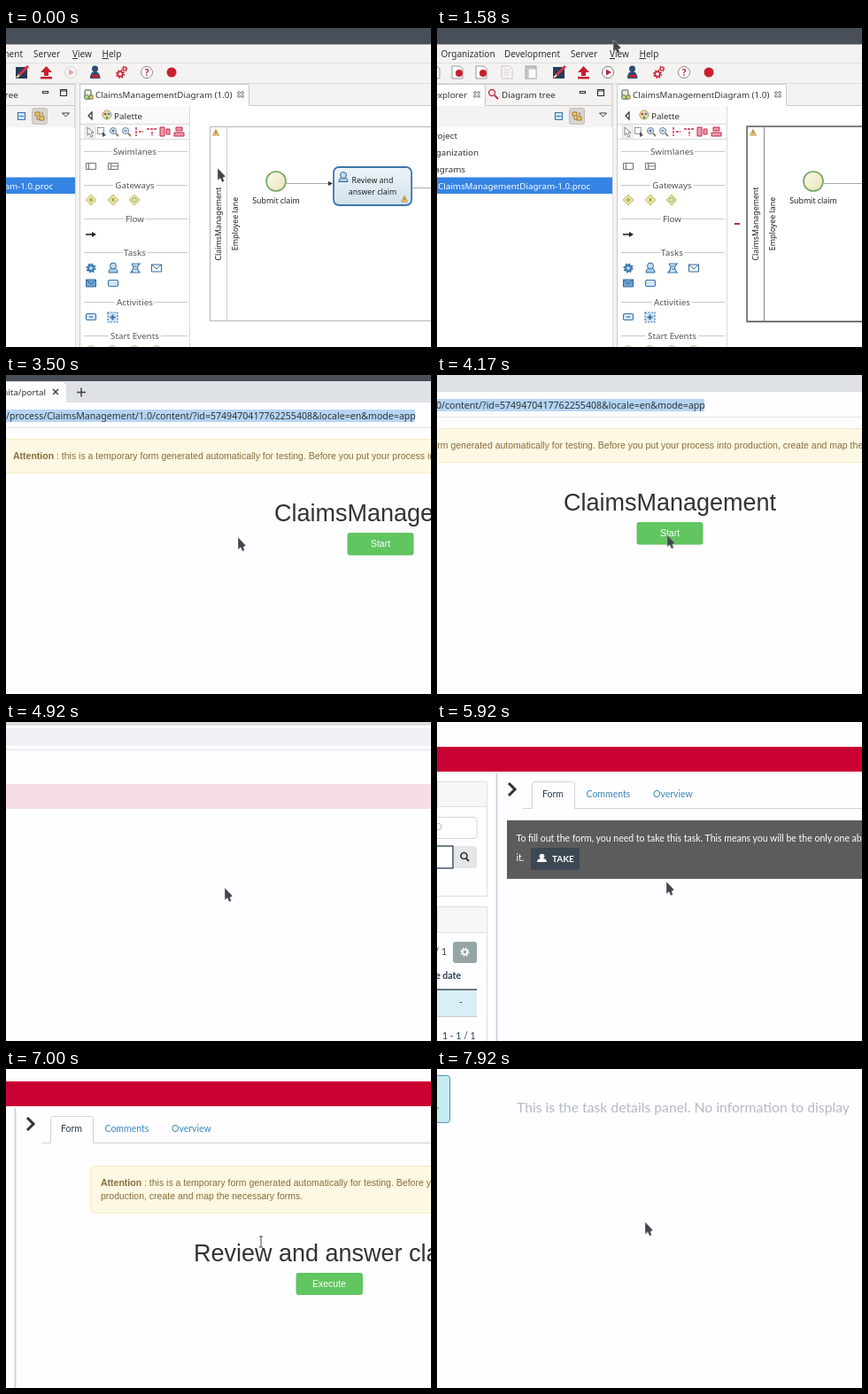
An HTML page that plays this animation: 480x360 px, repeating every 8 s.

```html
<!DOCTYPE html>
<html lang="en">
<head>
<meta charset="utf-8">
<title>Process designer walkthrough</title>
<style>
html, body { margin: 0; width: 100%; height: 100%; overflow: hidden; background: #fefdff; }
svg { display: block; width: 480px; height: 360px; }
text { white-space: pre; }
.ui { font: 9.8px "Noto Sans", sans-serif; fill: #2e3436; }
.menu { font-size: 10px; }
.heading { fill: #505457; }
.small { font-size: 8.8px; fill: #1d2022; }
.mid { text-anchor: middle; }
.end { text-anchor: end; }
.web { font: 10.5px "Liberation Sans", Arial, sans-serif; fill: #8a6d3b; }
.web .title { font-size: 27px; fill: #333; text-anchor: middle; }
.web .label { fill: #fff; text-anchor: middle; }
.portal { font: 10.5px Lato, sans-serif; fill: #2c3e50; }
.bold { font-weight: bold; }
.link { fill: #3a87ba; }
.line { fill: none; stroke: #c9c9c9; }
.blue { fill: #d3e5f4; stroke: #3a76ab; stroke-width: 1.2; }
.red { fill: none; stroke: #c22a4a; stroke-width: 1.4; }
.dark { fill: none; stroke: #333; stroke-width: 1.2; }
.gray { fill: #fff; stroke: #777; }

/* Camera moves and hard cuts share one 8 s clock. */
.move, .cut { animation: 8s ease-in-out infinite; }
.cut { opacity: 0; animation-timing-function: step-end; }
#editor { animation-name: editor-on; }
#editor .move { animation-name: editor-pan; }
#browser { animation-name: browser-on; }
#browser .move { animation-name: browser-pan; }
#testForm { animation-name: test-form-on; }
#portal { animation-name: portal-on; }
#portal > .move { animation-name: portal-pan; }
#header { animation-name: header-fade; animation-timing-function: linear; }
#lists { animation-name: lists-on; }
#takeBox { animation-name: take-on; }
#taskForm { animation-name: task-form-on; }
#details { animation-name: details-on; }
.idle { animation-name: idle-on; }
.picked { animation-name: picked-on; }
#pointer { animation-name: pointer-path; }
#arrow { animation-name: arrow-on; }
#beam { animation-name: beam-on; }

@keyframes editor-on { 0% { opacity: 1 } 29.2% { opacity: 0 } }
@keyframes idle-on { 0% { opacity: 1 } 5% { opacity: 0 } }
@keyframes picked-on { 0% { opacity: 0 } 5%, 100% { opacity: 1 } }
@keyframes browser-on { 0% { opacity: 0 } 29.2% { opacity: 1 } 53.8% { opacity: 0 } }
@keyframes test-form-on { 0% { opacity: 0 } 33.5%, 100% { opacity: 1 } }
@keyframes portal-on { 0% { opacity: 0 } 53.8%, 100% { opacity: 1 } }
@keyframes header-fade { 0%, 61% { opacity: 0 } 61.5% { opacity: .12 } 64%, 100% { opacity: 1 } }
@keyframes lists-on { 0% { opacity: 0 } 65% { opacity: 1 } 93.2%, 100% { opacity: 0 } }
@keyframes take-on { 0% { opacity: 0 } 69% { opacity: 1 } 80.2%, 100% { opacity: 0 } }
@keyframes task-form-on { 0% { opacity: 0 } 82.8% { opacity: 1 } 93.2%, 100% { opacity: 0 } }
@keyframes details-on { 0% { opacity: 0 } 95.8%, 100% { opacity: 1 } }
@keyframes arrow-on { 0% { opacity: 1 } 86.5% { opacity: 0 } 89.2%, 100% { opacity: 1 } }
@keyframes beam-on { 0% { opacity: 0 } 86.5% { opacity: 1 } 89.2%, 100% { opacity: 0 } }

@keyframes editor-pan {
  0%, 11.5% { transform: translate(-120px, 0) }
  19.75% { transform: translate(0, 0) }
  24%, 100% { transform: translate(40px, 0) }
}
@keyframes browser-pan {
  0%, 31% { transform: translate(50px, 12px) }
  41%, 43.75% { transform: translate(0, 0) }
  51.5%, 100% { transform: translate(-160px, -12px) }
}
@keyframes portal-pan {
  0%, 53.8% { transform: translate(0, 56px) }
  58%, 63.5% { transform: translate(0, 42px) }
  72%, 74% { transform: translate(0, 0) }
  78.5%, 81% { transform: translate(107px, 26px) }
  87.5% { transform: translate(-57px, -14px) }
  92%, 100% { transform: translate(-134px, -61px) }
}
@keyframes pointer-path {
  0%, 6% { transform: translate(239px, 158px) }
  11% { transform: translate(236px, 100px) }
  19.75% { transform: translate(199px, 13px) }
  24%, 31% { transform: translate(234px, 46px) }
  40%, 43.75% { transform: translate(262px, 183px) }
  51.5% { transform: translate(260px, 180px) }
  58%, 63.5% { transform: translate(247px, 187px) }
  72%, 74% { transform: translate(259px, 180px) }
  78.5%, 81% { transform: translate(240px, 180px) }
  87.5% { transform: translate(288px, 195px) }
  92% { transform: translate(278px, 190px) }
  97%, 100% { transform: translate(235px, 172.5px) }
}
</style>
</head>
<body>
<svg viewBox="0 0 480 360">
  <defs>
    <g id="person"><path d="M-5 5.500q0-5 5-5t5 5z" fill="#a9cbe8" stroke="#2f689c"/><circle cy="-2" r="3.500" fill="#c3dcf1" stroke="#2f689c"/></g>
    <g id="gear" fill="none"><circle r="4.600" stroke-width="2" stroke-dasharray="1.800 1.800"/><circle r="3" stroke-width="1.800"/></g>
    <g id="mail"><path d="M-5.500-4h11v8h-11z" stroke="#2f689c"/><path d="M-5.500-4 0 1 5.500-4" fill="none" stroke="#2f689c"/></g>
    <g id="warn"><path d="M0-3.500 3.500 3H-3.500z" fill="#f3d98c" stroke="#c09a45" stroke-linejoin="round"/><path d="M0-1.500V1.500" stroke="#6b5320"/></g>
    <path id="diamond" d="M0-6 6 0 0 6-6 0z" fill="#e7e6a4" stroke="#c2bd6a"/>
    <path id="close" d="M-3.500-2-2-3.500 0-1.500 2-3.500 3.500-2 1.500 0 3.500 2 2 3.500 0 1.500-2 3.500-3.500 2-1.500 0z" fill="#fff" stroke="#4a4a4a"/>
    <path id="sheet" d="M-6-7H3L6-4V7H-6z" fill="#fafafa" stroke="#9a9a9a"/>
    <g id="zoom" fill="none"><circle cx="-1" cy="-1" r="3.500" fill="#e3eef8" stroke="#5a7fa8"/><path d="M2 2 5 5" stroke="#8a7a60" stroke-width="1.800"/></g>
    <linearGradient id="taskFill" x2="0" y2="1"><stop stop-color="#eef3f8"/><stop offset="1" stop-color="#d3e1ee"/></linearGradient>
    <linearGradient id="eventFill" x2="1" y2="1"><stop stop-color="#fdfbee"/><stop offset="1" stop-color="#ebe3b8"/></linearGradient>
  </defs>

  <g id="editor" class="cut"><g class="move ui">
    <rect x="-130" width="900" height="360" fill="#f4f3f2"/>
    <rect x="-130" width="900" height="18.500" fill="#494f59"/>
    <g class="menu">
      <text x="-28" y="33">Edit</text><text x="4.500" y="33">Organization</text><text x="76" y="33">Development</text>
      <text x="151" y="33">Server</text><text x="195" y="33"><tspan text-decoration="underline">V</tspan>iew</text>
      <text x="228.500" y="33"><tspan text-decoration="underline">H</tspan>elp</text>
    </g>
    <path class="line" d="M-130 39.500H770M-130 62.500H770" stroke-opacity=".5"/>

    <g transform="translate(0 50)">
      <use href="#sheet" x="-3"/><use href="#sheet" x="23"/><use href="#sheet" x="50"/>
      <circle cx="25" cy="1" r="4" fill="#c8202f"/><circle cx="52" cy="1" r="4" fill="#c8202f"/>
      <g opacity=".5"><use href="#sheet" x="79"/><path d="M75-3H82M75 0H82M75 3H82" stroke="#c99"/></g>
      <g opacity=".6"><rect x="100" y="-7" width="12" height="14" fill="#aaa" stroke="#777"/><rect x="103" y="-4" width="9" height="11" fill="#fff" stroke="#999"/></g>
      <rect x="131" y="-6" width="13" height="13" fill="#263c59"/><path d="M134 4 145-7" stroke="#d33844" stroke-width="3"/><path d="M132 6 135 3" stroke="#f3d9a0" stroke-width="2"/>
      <path d="M165.500-7 172 0H168V4H163V0H159zM159 5H172V7.500H159z" fill="#c8202f"/>
      <g class="cut idle"><circle cx="193" r="6.500" fill="#f7f4f3" stroke="#d8d3d3"/><path d="M191-3.500V3.500L197 0z" fill="#e0a6ab"/></g>
      <g class="cut picked"><circle cx="193" r="6.500" fill="#fff" stroke="#777"/><path d="M191-3.500V3.500L197 0z" fill="#c8202f"/></g>
      <circle cx="220.500" cy="-4" r="3.500" fill="#2e4c73"/><path d="M215 7q0-8 5.500-8t6 8z" fill="#2e4c73"/><path d="M217 3H225V6H217z" fill="#c8202f"/>
      <use href="#gear" transform="translate(249 2) scale(.9)" stroke="#c8202f"/><use href="#gear" transform="translate(254 -4) scale(.6)" stroke="#c8202f"/>
      <circle cx="279" r="6.500" fill="#fff" stroke="#888"/><text class="bold mid" x="279" y="4" style="fill:#c8202f">?</text>
      <circle cx="307" r="5.500" fill="#c8202f"/>
    </g>

    <rect x="-130" y="64" width="184" height="24" fill="#fff"/>
    <path class="line" d="M-130 63.500H198V360M54.500 64V87.500H198"/>
    <text class="end" x="34" y="79">Project explorer</text><use href="#close" x="45" y="75"/>
    <circle cx="62" cy="73" r="3.500" fill="#f6e3e3" stroke="#b5343f" stroke-width="1.300"/><path d="M65 76 69 80" stroke="#b5343f" stroke-width="2"/>
    <text x="73" y="79">Diagram tree</text>
    <path class="dark" d="M161.500 71.500h6v2h-6zM181.500 69.500h7v7h-7zM181.500 71h7"/>
    <rect x="-130" y="112" width="328" height="248" fill="#fff"/>
    <path class="blue" d="M133.500 95.500h8v8h-8zM135 99.500h5"/>
    <rect x="149.500" y="90.500" width="17" height="18" rx="2" fill="#d8d4d0" stroke="#c2beba"/>
    <path d="M153 95h5v4h-5zM158 100h5v4h-5z" fill="#f2cd70" stroke="#a57720"/><path d="M155 100v3h3M161 95v4" fill="none" stroke="#a57720"/>
    <path d="M183.500 96h8L187.500 100z" fill="#fff" stroke="#333"/>
    <text class="end" x="23" y="125">My project</text><text class="end" x="47" y="144">Organization</text><text class="end" x="32" y="163">Diagrams</text>
    <rect x="-130" y="168.500" width="328" height="18.500" fill="#3584e4"/><text x="1" y="182" style="fill:#fff">ClaimsManagementDiagram-1.0.proc</text>

    <rect x="204" y="88" width="566" height="272" fill="#fff"/>
    <path d="M203.500 360V63.500H394.500V87.500H770" fill="#fff"/>
    <path class="line" d="M203.500 360V63.500H394.500V87.500H770"/>
    <rect x="209" y="70" width="7" height="10" rx="1" fill="#f7f1cf" stroke="#36546f"/><circle cx="211" cy="78" r="2.500" fill="#b9d38f" stroke="#496"/><path d="M214 76H218V80H214z" fill="#f2cd70" stroke="#86703a"/>
    <text x="221" y="79">ClaimsManagementDiagram (1.0)</text><use href="#close" x="385" y="75"/>

    <rect x="204" y="88" width="123" height="21" fill="#fafafa"/>
    <path class="dark" d="M217 95 213 99 217 103z"/>
    <circle cx="234" cy="98" r="5" fill="#efe2b0" stroke="#b49d58"/><circle cx="232" cy="97" r="1.500" fill="#d34545"/><circle cx="236" cy="97" r="1.500" fill="#458ad3"/><circle cx="234" cy="101" r="1.500" fill="#48a652"/>
    <text x="242" y="102.500">Palette</text>
    <path class="line" d="M204 108.500H327M327.500 88V360M204 125.500H327" stroke-opacity=".7"/>
    <g transform="translate(0 117)">
      <rect x="209" y="-7" width="12" height="14" fill="#f1f1f1" stroke="#ddd"/><path d="M212-5V4L214 2 216 6 218 5 216 1H219z" fill="#fff" stroke="#666" stroke-width=".8"/>
      <path d="M223.500-4.500h7v7h-7z" fill="none" stroke="#567" stroke-dasharray="2 1"/><path d="M229 0V6L233 4z" fill="#555"/>
      <use href="#zoom" x="242"/><use href="#zoom" x="256"/><path d="M239.500-1h3M241-2.500v3M253.500-1h3" stroke="#345"/>
      <path class="red" d="M267-5V5M270 0H275M279-3H291M285 0V5" stroke-dasharray="3 1"/>
      <path d="M294-5h5V5h-5zM301-3h4V3h-4zM312-5h7v4h-7zM310 1h11v4h-11z" fill="#ee9aac" stroke="#c22a4a"/>
    </g>
    <path class="line" d="M208 139.500H239M291 139.500H325M208 177.500H241M289 177.500H325M208 215.500H253M277 215.500H325M208 253.500H252M279 253.500H325M208 309.500H243M287 309.500H325M208 347.500H236M295 347.500H325"/>
    <g class="mid heading"><text x="265.500" y="142.500">Swimlanes</text><text x="265.500" y="180.500">Gateways</text><text x="265.500" y="218.500">Flow</text><text x="265.500" y="256.500">Tasks</text><text x="265.500" y="312.500">Activities</text><text x="265.500" y="350.500">Start Events</text></g>
    <path class="gray" d="M210.500 152.500h11v7h-11zM213.500 152.500v7M235.500 152.500h11v7h-11zM238.500 152.500v7M238.500 156h8"/>
    <use href="#diamond" x="216" y="194"/><use href="#diamond" x="241" y="194"/><use href="#diamond" x="265" y="194"/>
    <path d="M213.500 194h5M216 191.500v5M239.500 192l3 4M242.500 192l-3 4" stroke="#8a9440"/><circle cx="265" cy="194" r="2.200" fill="#fff" stroke="#8a9440"/>
    <path d="M210 233H218" stroke="#222" stroke-width="1.600"/><path d="M217 230V236L222 233z" fill="#222"/>
    <circle cx="216" cy="271" r="5" fill="#b9d5ed"/><use href="#gear" x="216" y="271" stroke="#3a76ab"/><use href="#person" x="241" y="270.500"/>
    <path class="blue" d="M262 266h9q-5 4 0 10h-10q5-5 1-10M263.500 269h4M265 272h4"/>
    <use href="#mail" x="290" y="271" fill="#fff"/><use href="#mail" x="216" y="288" fill="#6fa3d0"/>
    <rect class="blue" x="235.500" y="284.500" width="11" height="7" rx="1.500"/><rect class="blue" x="210.500" y="322.500" width="11" height="7" rx="1.500"/><path class="blue" d="M214 326h4"/>
    <rect class="blue" x="235" y="321" width="11" height="11" stroke-dasharray="2 1.500"/><path class="blue" d="M237.500 326.500h6M240.500 323.500v6" style="stroke-width:2"/>
    <g fill="#f7f5d5" stroke="#b5c196"><circle cx="216" cy="364" r="5.500"/><circle cx="240" cy="364" r="5.500"/><circle cx="265" cy="364" r="5.500"/><circle cx="290" cy="364" r="5.500"/></g>

    <rect x="350.500" y="111.500" width="500" height="219" fill="#fff" stroke="#b5b5b5"/>
    <path class="line" d="M369.500 111V331" stroke="#aaa"/>
    <g class="cut picked"><rect x="350" y="111" width="500" height="220.500" fill="none" stroke="#555" stroke-width="1.300"/><path d="M369.500 111V331" stroke="#888"/><path d="M336 221H342" stroke="#c22a35" stroke-width="2"/></g>
    <use href="#warn" x="357" y="118"/>
    <g class="small mid"><text transform="translate(363 221) rotate(-90)">ClaimsManagement</text><text transform="translate(382 221) rotate(-90)">Employee lane</text>
      <text x="425" y="198">Submit claim</text></g>
    <circle cx="425" cy="173" r="11" fill="url(#eventFill)" stroke="#76a862" stroke-width="1.700"/>
    <path d="M436.500 175.500H486M579 180.500H770" stroke="#aaa"/><path d="M484 173V178L489 175.500z" fill="#333"/>
    <rect x="490" y="157" width="88" height="43" rx="6" fill="url(#taskFill)" stroke="#3d75ad" stroke-width="1.800"/>
    <use href="#person" x="501" y="168"/><use href="#warn" x="570" y="193"/>
    <g class="small mid"><text x="534" y="175">Review and</text><text x="534" y="188">answer claim</text></g>
  </g></g>

  <g id="browser" class="cut"><g class="move">
    <rect x="-60" y="-20" width="900" height="420" fill="#fefdff"/>
    <rect x="-60" y="-20" width="900" height="27" fill="#494f59"/>
    <text class="ui mid" x="295" y="0" style="fill:#e6e6e8">Process form – Web Browser</text>
    <rect x="-60" y="7" width="900" height="24" fill="#dee1e6"/>
    <path d="M-60 31V8H62Q68 8 68 14V31z" fill="#fefdff"/>
    <text class="ui end" x="45" y="23">bonita/portal</text>
    <path d="M53 16 59 22M59 16 53 22M80 19.500H90M85 14.500V24.500" stroke="#444" stroke-width="1.500"/>
    <rect x="-60" y="39" width="522" height="14" fill="#b6d5f4"/>
    <text class="ui" x="0" y="50" style="font-size:10.6px">/process/ClaimsManagement/1.0/content/?id=5749470417762255408&amp;locale=en&amp;mode=app</text>
    <path d="M-60 59.500H840" stroke="#e2e2e6"/>
    <g id="testForm" class="cut web">
      <rect x="-4" y="72.500" width="854" height="38" rx="3" fill="#fcf8e3" stroke="#f5ebc9"/>
      <text x="8" y="95"><tspan class="bold">Attention</tspan> : this is a temporary form generated automatically for testing. Before you put your process into production, create and map the necessary forms.</text>
      <text class="title" x="423" y="165">ClaimsManagement</text>
      <rect x="385.500" y="178" width="75" height="25.500" rx="3" fill="#61c560"/><text class="label" x="423" y="194">Start</text>
    </g>
  </g></g>

  <g id="portal" class="cut"><g class="move portal">
    <rect x="-130" y="-80" width="900" height="560" fill="#fefdff"/>
    <rect x="-130" y="-80" width="900" height="42" fill="#dcdee1"/>
    <rect x="-130" y="-35" width="900" height="20" fill="#f1f0f5"/>
    <path d="M-130 -10.500H770" stroke="#e0e2ea"/>
    <rect id="header" class="move" x="-130" y="28" width="900" height="28" fill="#cb0033"/>
    <g id="lists" class="cut">
      <path d="M67.500 58V480" stroke="#cfcfd5" stroke-width="1.800"/>
      <g fill="none" stroke="#dedee2"><path d="M-130 67.500H56.500V196.500H-130M-130 208.500H56.500V480"/></g>
      <path d="M-130 68H56V95H-130zM-130 209H56V237H-130z" fill="#f7f7f8"/>
      <path class="line" d="M-130 95.500H56M-130 237.500H56M.5 68V95M.5 209V237" stroke-opacity=".6"/>
      <rect x="-110" y="107.500" width="155" height="24" rx="3" fill="#fff" stroke="#d5d9dc"/><text class="end" x="6" y="122" style="fill:#b5bcc0">Case ID</text>
      <rect x="18" y="140" width="27" height="25" rx="3" fill="#e5e6e8"/><rect x="-110" y="140" width="128" height="25" fill="#fff" stroke="#42566a" stroke-width="1.500"/>
      <circle cx="30.500" cy="151" r="3.500" fill="none" stroke="#333" stroke-width="1.700"/><path d="M33 154 36 157" stroke="#333" stroke-width="2"/>
      <text class="end" x="11" y="263">1 - 1 / 1</text><rect x="18" y="248" width="27" height="24" rx="3" fill="#95a5a6"/><use href="#gear" transform="translate(31.500 259.500) scale(.9)" stroke="#fff"/>
      <text class="bold end" x="27" y="290">Due date</text><path d="M-110 302H45" stroke="#3a4b5c" stroke-width="1.500"/>
      <rect x="-110" y="303" width="155" height="29" fill="#d9eff7"/><text x="25" y="320">-</text><path class="line" d="M-110 332.500H45"/><text x="6" y="358">1 - 1 / 1</text>
      <path d="M81 69 88 76 81 83" fill="none" stroke="#333" stroke-width="3"/>
      <path d="M97 97.500H107.500V70.500Q107.500 67.500 110.500 67.500H152.500Q155.500 67.500 155.500 70.500V97.500H770" fill="none" stroke="#cfd2d6"/>
      <text x="119" y="85">Form</text><text class="link" x="168.500" y="85">Comments</text><text class="link" x="244" y="85">Overview</text>
    </g>
    <g id="takeBox" class="cut" style="fill:#fff">
      <rect x="79" y="111" width="690" height="66" fill="#5c5c5d"/>
      <text x="89.500" y="135">To fill out the form, you need to take this task. This means you will be the only one able to do</text><text x="89.500" y="157">it.</text>
      <rect x="106" y="142" width="55" height="25" rx="3" fill="#3c4853"/><circle cx="118.500" cy="151.500" r="2.800"/><path d="M113 158q0-4 5.500-4t5.500 4z"/><text class="bold" x="130" y="158" style="font-size:10px">TAKE</text>
    </g>
    <g id="taskForm" class="cut web">
      <rect x="152.500" y="123.500" width="540" height="53" rx="3" fill="#fcf8e3" stroke="#f5ebc9"/>
      <text x="164" y="146"><tspan class="bold">Attention</tspan> : this is a temporary form generated automatically for testing. Before you put your process into</text><text x="164" y="161">production, create and map the necessary forms.</text>
      <text class="title" x="422" y="231">Review and answer claim</text>
      <rect x="384.500" y="244" width="75.500" height="25" rx="3" fill="#61c560"/><text class="label" x="422" y="260">Execute</text>
    </g>
    <g id="details" class="cut">
      <rect x="60" y="68.500" width="88.500" height="53" rx="3" fill="#c5ebf3" stroke="#4795b5"/><text x="134" y="106">.</text>
      <text x="224" y="110" style="font-size:15.75px;fill:#b4bcc2">This is the task details panel. No information to display</text>
    </g>
  </g></g>

  <g id="pointer" class="move">
    <path id="arrow" class="cut" d="M0 0V14L3 11.500 5 16 7.500 15 6 11 9 9.500z" fill="#43464b" stroke="#fff" stroke-opacity=".6" stroke-width=".6"/>
    <path id="beam" class="cut" d="M-2-6H2M0-6V6M-2 6H2" fill="none" stroke="#444"/>
  </g>
</svg>
</body>
</html>
```
